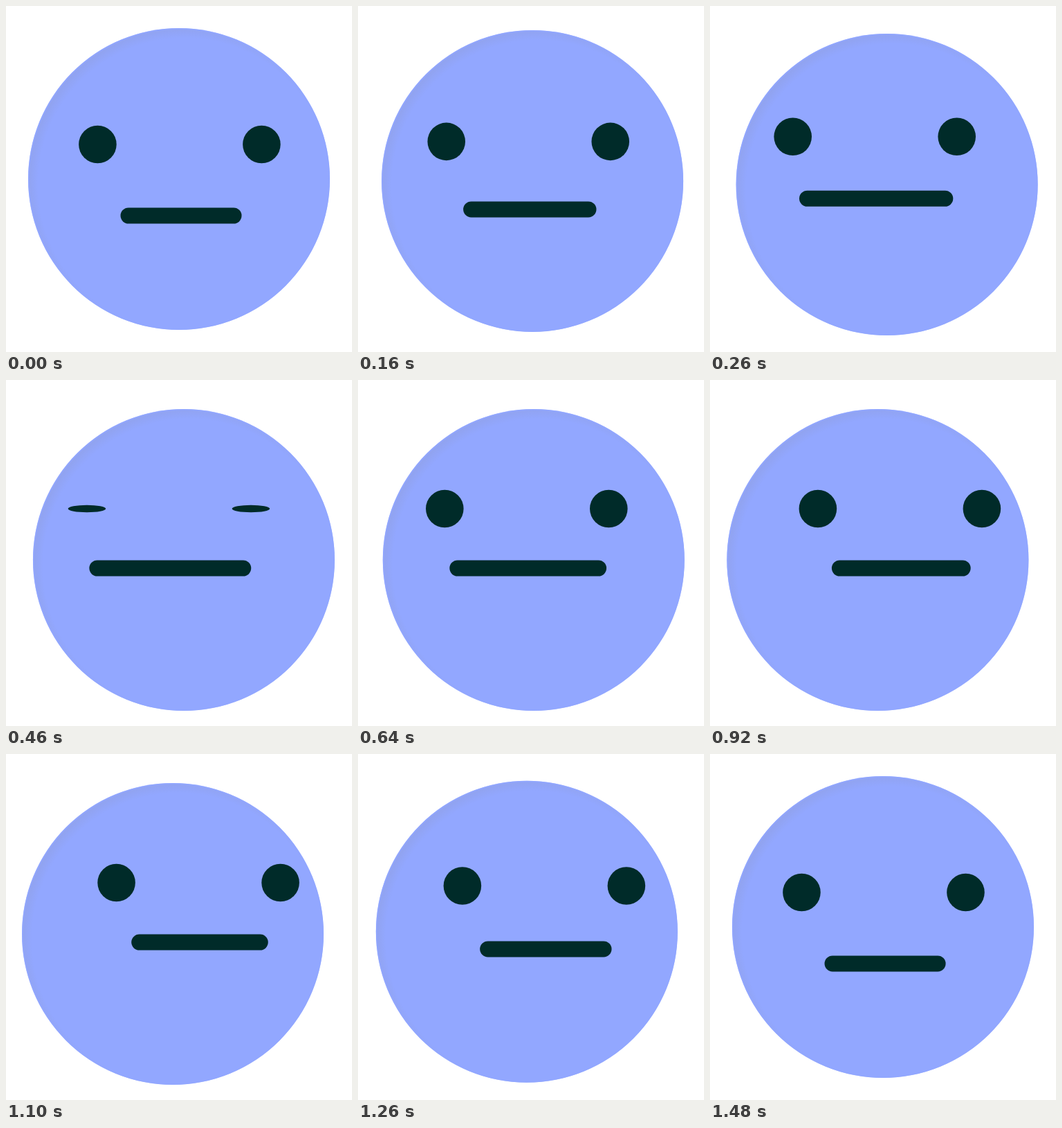
These frames come from a looping animation (500 px wide and 500 px high, 1.5 s). An HTML page:

```html
<!DOCTYPE html>
<html>
<head>
<meta charset="utf-8">
<style>
  html, body { margin: 0; width: 100%; height: 100%; overflow: hidden; background: #fff; }
  svg { display: block; width: 100%; height: 100%; }
</style>
</head>
<body>
<svg viewBox="0 0 500 500">
  <defs>
    <radialGradient id="shine" gradientUnits="userSpaceOnUse" r="1" gradientTransform="translate(14 -204) scale(208 180)">
      <stop offset="0" stop-color="#fff" stop-opacity=".56"/>
      <stop offset="1" stop-color="#505050" stop-opacity="0"/>
    </radialGradient>
    <radialGradient id="shade" gradientUnits="userSpaceOnUse" cx="8" cy="8" r="230">
      <stop offset=".92" stop-color="#888" stop-opacity="0"/>
      <stop offset="1" stop-color="#888" stop-opacity=".16"/>
    </radialGradient>
  </defs>
  <g id="face">
    <circle r="218" fill="#92a7ff"/>
    <circle r="217" fill="url(#shine)"/>
    <circle r="217" fill="url(#shade)"/>
    <circle r="217" fill="none" stroke="#92a7ff" stroke-width="2" stroke-opacity=".7"/>
  </g>
  <g fill="#002b29">
    <ellipse id="left" rx="27.3"/>
    <ellipse id="right" rx="27.3"/>
  </g>
  <line id="mouth" stroke="#002b29" stroke-width="23" stroke-linecap="round"/>
</svg>
<script>
const LOOP = 1500, EYE_R = 27.3, EYE_GAP = 237;
const TURNS = [0, 400, 1090, LOOP];
const BLINK = [0, 370, 470, 570, LOOP];

// Pose: face x, face y, eye x, eye y, mouth left, mouth right, mouth y
const REST = [250, 250, 132.4, 200, 177, 329, 303];
const LEFT = [257.1, 260, 116.5, 186, 131.3, 342.5, 272];
const RIGHT = [241, 260, 159.6, 186, 192.7, 367.3, 272];
const POSES = [REST, LEFT, RIGHT, REST];

const $ = id => document.getElementById(id);
const set = (id, attrs) => {
  for (const name in attrs) $(id).setAttribute(name, attrs[name]);
};

// cubic-bezier(.56, 0, .44, 1)
function ease(x) {
  let lo = 0, hi = 1;
  for (let i = 0; i < 20; i++) {
    const t = (lo + hi) / 2, u = 1 - t;
    if (1.68 * t * u * u + 1.32 * t * t * u + t * t * t < x) lo = t; else hi = t;
  }
  return lo * lo * (3 - 2 * lo);
}

function tween(times, poses, t) {
  let i = 0;
  while (i < times.length - 2 && t >= times[i + 1]) i++;
  const p = ease((t - times[i]) / (times[i + 1] - times[i]));
  return poses[i].map((a, k) => a + (poses[i + 1][k] - a) * p);
}

function draw() {
  const t = performance.now() % LOOP;
  const [fx, fy, ex, ey, x1, x2, my] = tween(TURNS, POSES, t);
  const [open] = tween(BLINK, [[1], [1], [.18], [1], [1]], t);
  set('face', { transform: `translate(${fx} ${fy})` });
  set('left', { cx: ex, cy: ey, ry: EYE_R * open });
  set('right', { cx: ex + EYE_GAP, cy: ey, ry: EYE_R * open });
  set('mouth', { x1, x2, y1: my, y2: my });
  requestAnimationFrame(draw);
}
draw();
</script>
</body>
</html>
```
